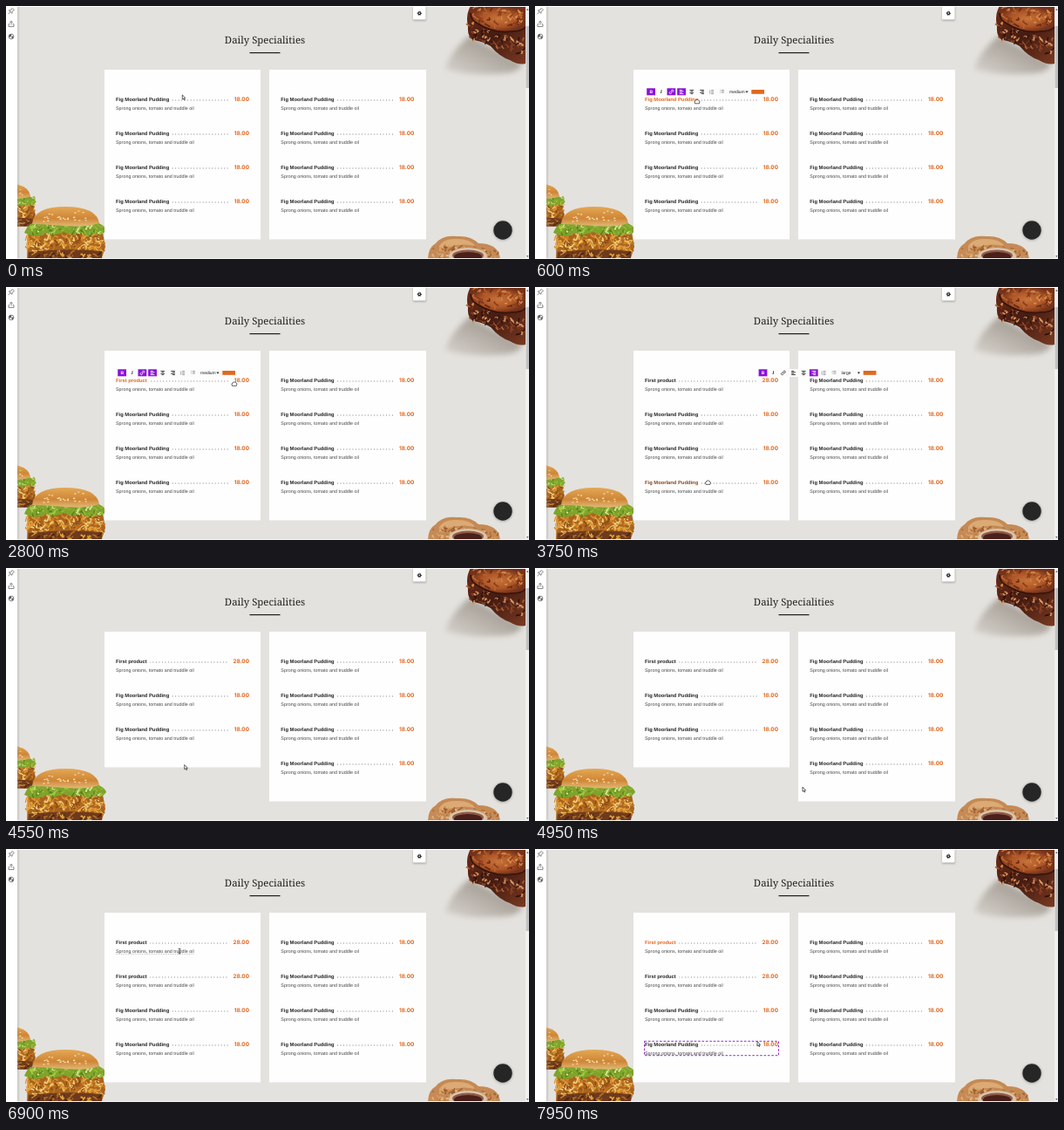
These frames come from a looping animation (600 by 290 pixels, 8 s). An HTML page:

```html
<!DOCTYPE html>
<html lang="en">
<head>
<meta charset="utf-8">
<title>Menu editor</title>
<style>
  html, body { margin: 0; width: 100%; height: 100%; overflow: hidden; background: #e4e2de; }
  svg { display: block; width: 100vw; height: 100vh; }
  text { text-rendering: geometricPrecision; }
  .heading { font: 11.4px "Noto Serif", serif; fill: #222; text-anchor: middle; }
  .name { font: bold 5.8px "Liberation Sans", sans-serif; }
  .note { font: 5.4px "Liberation Sans", sans-serif; fill: #484848; }
  .price { font: 700 6.4px Inter, sans-serif; fill: #e2681f; text-anchor: end; }
  .tool { font: 5px "Liberation Sans", sans-serif; fill: #222; }
</style>
</head>
<body>
<svg viewBox="0 0 600 290">
  <defs>
    <linearGradient id="bun" x2="0" y2="1">
      <stop stop-color="#e3a855"/><stop offset=".6" stop-color="#cf8636"/><stop offset="1" stop-color="#e2b878"/>
    </linearGradient>
    <linearGradient id="sear" x2="1" y2="1">
      <stop stop-color="#6b2c18"/><stop offset=".5" stop-color="#451c12"/><stop offset="1" stop-color="#7a3a22"/>
    </linearGradient>
    <radialGradient id="meat">
      <stop stop-color="#c8743a"/><stop offset=".6" stop-color="#ad5527"/><stop offset="1" stop-color="#74321a"/>
    </radialGradient>
    <linearGradient id="cast" x1="1" y1="0" x2="0" y2="1">
      <stop stop-color="#8d857b"/><stop offset="1" stop-color="#d8d4ce"/>
    </linearGradient>
    <filter id="soft" x="-30%" y="-30%" width="160%" height="160%"><feGaussianBlur stdDeviation="3"/></filter>
    <filter id="shade" x="-30%" y="-30%" width="160%" height="160%"><feGaussianBlur stdDeviation="1"/></filter>
    <clipPath id="page"><path d="M13 1H596V289H13Z"/></clipPath>
  </defs>
  <rect width="600" height="290" fill="#e4e2de"/>
  <g id="food" clip-path="url(#page)"></g>

  <!-- window chrome -->
  <rect x="12" width="2.5" height="290" fill="#999" opacity=".45" filter="url(#shade)"/>
  <path d="M0 0H600V1H13V290H0Z" fill="#fff"/>
  <path d="M13 289H600V290H13Z" fill="#f3f3f2"/>
  <path d="M596 1H600V290H596Z" fill="#f0f0f0"/>
  <path d="M596.5 23H600V94H596.5Z" fill="#c1c1c1"/>
  <path d="M597 5L598.3 3L599.6 5ZM597 286L598.3 288L599.6 286Z" fill="#666"/>
  <g fill="none" stroke="#555" stroke-width=".7">
    <path d="M2.6 9.3L5 6.6M3.3 5L7 8.4L7 6.5L9.4 4.6L7.3 2.5L5.3 5Z"/>
    <path d="M4.2 19.3L6 17.3L7.8 19.3M6 17.5V21.5M4.2 20.8H3V23.6H9V20.8H7.8"/>
    <circle cx="6" cy="35" r="2.9"/>
    <path d="M4 33.2L6 32.8L5.6 34.8L3.8 35.5ZM6.6 35.2L8.3 34.8L7.2 37.2Z" fill="#555"/>
  </g>
  <rect x="467" y="1" width="15" height="16" rx="1" fill="#777" opacity=".5" filter="url(#shade)"/>
  <rect x="467" y="0" width="14.5" height="15.5" rx="1" fill="#fff"/>
  <circle cx="474.3" cy="8.3" r="1.9" fill="#222"/>
  <circle cx="474.3" cy="8.3" r="2.2" fill="none" stroke="#222" stroke-width="1" stroke-dasharray=".9 .83"/>
  <circle cx="474.3" cy="8.3" r=".8" fill="#fff"/>
  <circle cx="570" cy="257.5" r="11.5" fill="#888" opacity=".5" filter="url(#shade)"/>
  <circle cx="570" cy="257" r="10.7" fill="#262626"/>

  <text class="heading" x="297" y="42.6">Daily Specialities</text>
  <path d="M279.5 53.6H314.5" stroke="#222" stroke-width="1.2"/>
  <g id="scene"></g>
</svg>
<script>
const LOOP = 8000, DISH = 'Fig Moorland Pudding', TYPED = 'First product';
const NOTE = 'Sprong onions, tomato and truddle oil';
const DARK = [38, 36, 36], ORANGE = [226, 104, 31], PURPLE = '#8a12d8';
const RIGHT_COLUMN = 189.3, ROW_PITCH = 39;

const within = (t, start, end) => t >= start && t < end;
const clamp = v => Math.max(0, Math.min(1, v));
const ease = p => p * p * (3 - 2 * p);

const ruler = document.createElement('canvas').getContext('2d');
function textWidth(text, font) {
  ruler.font = font;
  return ruler.measureText(text).width / 10;
}
const nameWidth = text => textWidth(text, 'bold 58px "Liberation Sans", sans-serif');
const priceWidth = text => textWidth(text, '700 64px Inter, sans-serif');

// Pointer stops: time, x, y
const POINTER = [
  [0, 202.3, 101.8], [150, 202.3, 101.8], [450, 186, 109.5], [2300, 186, 109.5],
  [2700, 262, 111], [3300, 262, 111], [3700, 198.5, 224], [4500, 198.5, 224],
  [4850, 307, 251], [5100, 307, 251], [5500, 190, 109], [6500, 190, 109],
  [6850, 199, 117], [7050, 199, 117], [7250, 255, 105], [7400, 255, 105],
  [7850, 255, 220.5], [LOOP, 255, 220.5]
];
// Highlighted names: row, start, end
const HOVERS = [[0, 200, 3450], [3, 3600, 4500], [0, 5400, 6500], [0, 7150, 9000]];

function pointerAt(t) {
  const i = POINTER.findIndex(stop => stop[0] > t);
  const [t0, x0, y0] = POINTER[i - 1], [t1, x1, y1] = POINTER[i];
  const p = ease((t - t0) / (t1 - t0));
  return [x0 + (x1 - x0) * p, y0 + (y1 - y0) * p];
}

function nameColor(row, t) {
  const level = Math.max(0, ...HOVERS.filter(h => h[0] === row)
    .map(([, start, end]) => Math.min(clamp((t - start) / 300), 1 - clamp((t - end) / 300))));
  return `rgb(${DARK.map((c, i) => Math.round(c + (ORANGE[i] - c) * level))})`;
}

function menuRow(x, index, name, price, color) {
  const y = 109 + index * ROW_PITCH;
  const start = x + nameWidth(name) + 3.5, end = x + 146 - priceWidth(price);
  return `<text class="name" x="${x}" y="${y}" fill="${color}">${name}</text>
    <path d="M${end} ${y - 1}H${start}" stroke="#555" stroke-width=".8" stroke-dasharray=".9 2.6"/>
    <text class="price" x="${x + 153}" y="${y + .1}">${price}</text>
    <text class="note" x="${x}" y="${y + 9.6}">${NOTE}</text>`;
}

const panel = (x, width, rows) =>
  `<rect x="${x}" y="73" width="${width}" height="${38.5 + rows * ROW_PITCH}" fill="#fefefe"/>`;

const lines = (x, ...widths) => widths.map((w, i) => `M${x(w)} ${-2 + i * 1.4}h${w}`).join('');
const TOOL_ICONS = [
  '<text class="tool" x="-1.8" y="1.8" style="font-weight:bold;fill:currentColor">B</text>',
  '<text class="tool" x="-1" y="1.9" style="font:italic bold 5.5px Liberation Serif,serif">I</text>',
  '<path d="M-.6 .6L.8-.8M-.6-1L.5-2Q1.5-2.7 2.2-1.8T2-.4L1 .6M.6 1L-.5 2Q-1.5 2.7-2.2 1.8T-2 .4L-1-.6"/>',
  `<path d="${lines(() => -2.4, 3, 4.8, 3, 4.8)}"/>`,
  `<path d="${lines(w => -w / 2, 4.8, 2.6, 4.8, 2.6)}"/>`,
  `<path d="${lines(w => 2.4 - w, 4.8, 3, 4.8, 3)}"/>`,
  `<path d="${lines(() => -1, 3, 3, 3, 3)}M-2.4-2v4.4" stroke="#777" stroke-width=".6"/>`,
  `<path d="${lines(() => -.8, 3, 3, 3)}M-2.4-2h.8m-.8 1.4h.8m-.8 1.4h.8" stroke="#777" stroke-width=".6"/>`
];

function toolbar(x, size, active) {
  const buttons = TOOL_ICONS.map((icon, i) => {
    const on = active.includes(i), color = on ? '#fff' : '#222';
    return `<g transform="translate(${5.2 + i * 11.65} 4.4)" color="${color}" stroke-width=".8">
      ${on ? `<rect x="-5" y="-4.1" width="9.8" height="8" fill="${PURPLE}"/>` : ''}
      <g fill="none" ${icon.startsWith('<path') ? `stroke="${color}"` : ''}>${icon}</g></g>`;
  }).join('');
  return `<g transform="translate(${x} 94)"><rect width="137" height="9" fill="#fcfcfc"/>${buttons}
    <text class="tool" x="95" y="6.2">${size}</text>
    <path d="M113.5 3.5h3l-1.5 2.3z" fill="#222"/>
    <rect x="120.3" y="2" width="14.7" height="4.8" fill="#e2681f"/></g>`;
}

const CURSORS = {
  arrow: '<path d="M0 0V5.2L1.2 4.2L2.1 6.1L2.9 5.7L2.1 3.9H3.6Z"/>',
  hand: '<path d="M-2.5 2.3L-3 .2Q-2.8-.8-1.9-.6Q-1.8-2.2-.7-1.9Q.1-2.7.8-1.8Q1.8-2 1.9-.9Q3-.8 2.9.3L2.4 2.3Z"/>',
  text: '<path d="M-1.3-2.8H1.3M0-2.8V2.8M-1.3 2.8H1.3"/>'
};

function cursorKind(t) {
  if (within(t, 200, 4550) || within(t, 5400, 6550)) return 'hand';
  return within(t, 6550, 7150) ? 'text' : 'arrow';
}

function firstName(t) {
  return t < 700 ? DISH : TYPED.slice(0, Math.max(0, Math.floor((t - 900) / 100)));
}
function firstPrice(t) {
  return t < 3050 ? '18.00' : '28.00'.slice(0, Math.floor((t - 3050) / 70));
}

function leftRows(t) {
  const first = [firstName(t), firstPrice(t)], plain = [DISH, '18.00'];
  if (t < 4500) return [first, plain, plain, plain];
  return t < 6000 ? [first, plain, plain] : [first, first, plain, plain];
}

function render(t) {
  const [x, y] = pointerAt(t), rows = leftRows(t);
  let out = panel(113, 179, rows.length) + panel(302, 180, 4);
  rows.forEach(([name, price], i) => out += menuRow(126, i, name, price, nameColor(i, t)));
  for (let i = 0; i < 4; i++) out += menuRow(126 + RIGHT_COLUMN, i, DISH, '18.00', nameColor(-1, t));

  if (within(t, 600, 3000)) out += toolbar(128, 'medium', [0, 2, 3]);
  if (within(t, 3000, 3800)) out += toolbar(256.4, 'large', [0, 5]);
  if (within(t, 6700, 7100))
    out += '<path d="M126 120.3H216" stroke="#888" stroke-width=".6" stroke-dasharray="1 1"/>';

  // Drop target under the dragged row
  const target = Math.round((y - 105) / ROW_PITCH);
  if (t > 7400 && target > 0)
    out += `<rect x="125.5" y="${103.3 + target * ROW_PITCH}" width="154" height="16.4" fill="none"
      stroke="${PURPLE}" stroke-width=".9" stroke-dasharray="2.6 1.8"/>`;

  out += `<g transform="translate(${x} ${y})" fill="#fff" stroke="#222" stroke-width=".7"
    stroke-linejoin="round">${CURSORS[cursorKind(t)]}</g>`;
  document.getElementById('scene').innerHTML = out;
}

let seed = 47;
const random = () => (seed = (seed * 16807) % 2147483647) / 2147483647;
const spread = size => (random() - .5) * size;
const pick = list => list[Math.floor(random() * list.length)];
const scatter = (count, draw) => Array.from({ length: count }, draw).join('');

// Short random strokes in a box that may lean downwards to the right
function strokes(count, [x, y, w, h], length, colors, lean = 0) {
  return scatter(count, () => {
    const across = random();
    return `<path d="M${x + across * w} ${y + random() * h + across * lean}q${spread(length)} ${spread(length)}
      ${spread(length)} ${spread(length)}" fill="none" stroke="${pick(colors)}" stroke-width="${.8 + random()}"/>`;
  });
}

function steak() {
  return `<path d="M504 72Q510 52 532 34L592 66Q590 78 560 78Q525 80 504 72Z" fill="url(#cast)" filter="url(#soft)"/>
    <path d="M533 0Q527 10 530 24Q529 36 537 39Q548 41 556 46Q566 58 578 62Q588 68 596 66V0Z" fill="url(#sear)"/>
    ${strokes(70, [532, 19, 62, 18], 9, ['#b2663b', '#d79a68', '#2c100a', '#8a4023'], 20)}
    <path d="M533 2Q530 14 541 20Q560 32 580 29Q592 29 596 24V0H535Z" fill="url(#meat)"/>
    ${strokes(45, [536, 1, 58, 19], 12, ['#8a3d1b', '#d98c4c', '#6b2a14', '#bb6730'], 5)}
    <path d="M533 8Q533 16 541 20Q560 32 580 29Q592 29 596 24" fill="none" stroke="#34130b" stroke-width="1.6"/>`;
}

function snacks() {
  return `<path d="M484 291Q484 277 493 272Q501 262 518 264Q533 263 542 272Q566 272 567 291Z" fill="#c58a55"/>
    <path d="M497 275Q503 266 518 267Q533 267 538 275Q518 270 497 281Z" fill="#dcaa74"/>
    ${strokes(60, [487, 276, 76, 13], 8, ['#b2703b', '#e3b582', '#d39a62', '#9c5c2e'])}
    <ellipse cx="530" cy="287" rx="22" ry="10" fill="#d8c4ac"/>
    <ellipse cx="530" cy="286" rx="18" ry="6.5" fill="#8d5b47"/>
    <ellipse cx="530" cy="287.5" rx="16" ry="5.5" fill="#4b1f1a"/>`;
}

function burger(x, y, scale) {
  const sesame = scatter(24, () => {
    const angle = random() * Math.PI, r = Math.sqrt(random());
    return `<ellipse cx="${Math.cos(angle) * r * 31}" cy="${17 - Math.sin(angle) * r * 14}" rx="1.2" ry=".7" fill="#f6dfae"/>`;
  });
  return `<g transform="translate(${x} ${y}) scale(${scale})">
    <path d="M-43 30Q0 22 43 30L46 46L41 62H-44Z" fill="#a8641f"/>
    ${strokes(170, [-43, 29, 86, 22], 13, ['#e8a63d', '#c9771f', '#f2cf7e', '#8b4a16', '#dd9430'])}
    <path d="M-42 52Q0 47 42 51V62H-43Z" fill="#6f3a1c"/>
    ${strokes(40, [-40, 52, 80, 7], 8, ['#e3a53f', '#4a2412', '#b0702c'])}
    <path d="M-47 30Q-42 18 -36 19Q0 14 36 18Q46 22 47 27Q41 35 35 30Q27 36 19 30Q8 34-2 29Q-13 35-21 30Q-34 37-47 30Z" fill="#7fa32c"/>
    ${strokes(75, [-43, 20, 87, 11], 9, ['#a9cc45', '#d9e695', '#55801c', '#8fb634'])}
    <path d="M-38 20Q-36 0 0 0T39 19Q24 24 0 22T-38 20Z" fill="url(#bun)"/>${sesame}</g>`;
}
document.getElementById('food').innerHTML =
  steak() + snacks() + burger(-3, 203, .8) + burger(68, 230, 1);

function frame(now) {
  render(now % LOOP);
  requestAnimationFrame(frame);
}
requestAnimationFrame(frame);
</script>
</body>
</html>
```
